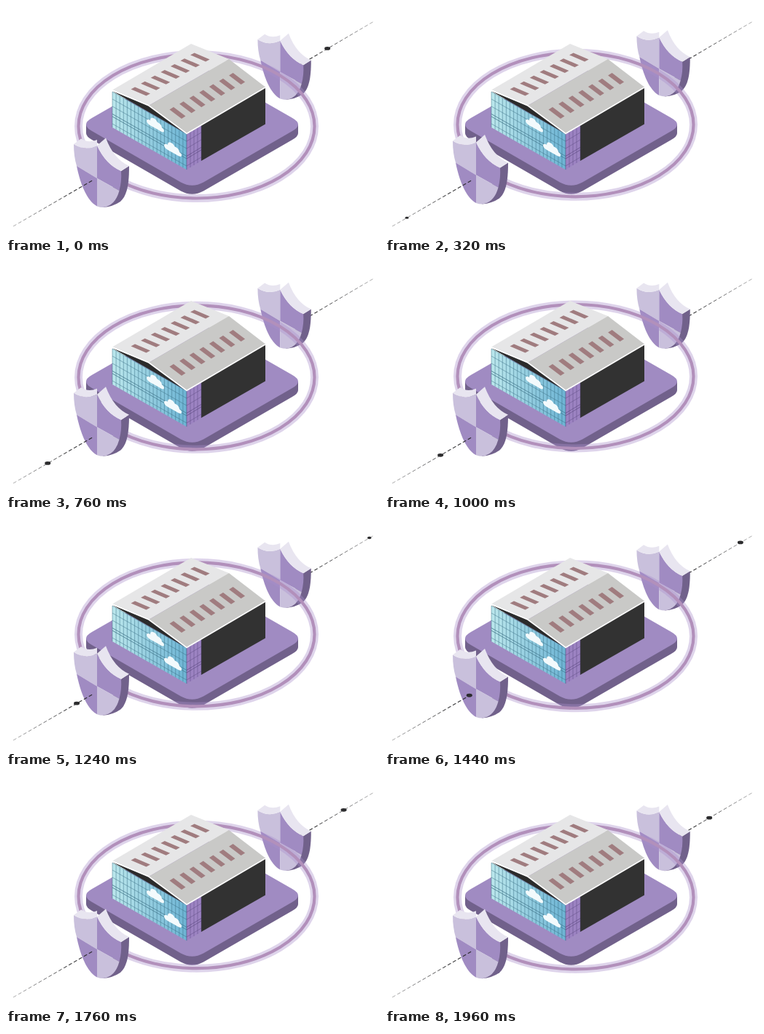
An HTML page that plays this animation: 512 px wide and 315 px high, repeating every 2000 ms.

```html
<!DOCTYPE html>
<html lang="en">
<head>
<meta charset="utf-8">
<title>Protected building</title>
<style>
  html, body { margin: 0; width: 100%; height: 100%; overflow: hidden; background: #fff; }
  svg { display: block; width: 100vw; height: 100vh; }
</style>
</head>
<body>
<svg viewBox="0 0 512 315">
  <defs>
    <linearGradient id="glass">
      <stop offset="0" stop-color="#bbe7ec"/>
      <stop offset="1" stop-color="#6db4d4"/>
    </linearGradient>
    <path id="slab" d="M118 172L240 242.5Q255.5 251 271 242.5L393 172Q409 163 393 154L271 84Q255.5 75 240 84L118 154Q102 163 118 172Z"/>
    <g id="cloud" fill="#f3fafc">
      <ellipse cx="-7" cy="2" rx="5" ry="3.5"/>
      <ellipse cx="-2" cy="-2" rx="5" ry="5"/>
      <ellipse cx="4" cy="0" rx="5" ry="4.5"/>
      <ellipse cx="8" cy="2.5" rx="4" ry="3"/>
      <rect x="-8" y="1" width="17" height="4.5" rx="2"/>
    </g>
    <g id="shield">
      <path fill="#71618b" d="M158 227L169 220C169 246 166 261 157 269Q147 276 133 277Z"/>
      <path fill="#c9c0dc" d="M93 190Q109 200 125 192V237L97 220Q93 207 93 190Z"/>
      <path fill="#a08bc2" d="M125 192Q137 218 158 227Q159 241 155.500 254L125 237Z"/>
      <path fill="#a08bc2" d="M97 220L125 237V275.500C111 268 102 245 97 220Z"/>
      <path fill="#c9c0dc" d="M125 237L155.500 254Q150 275 133 277Q129 277 125 275.500Z"/>
      <path fill="#e8e5f0" d="M93 190L103 182.500Q113 189 125 184V192Q109 200 93 190Z"/>
      <path fill="#e8e5f0" d="M125 192L137 181.500Q148 211 169 220L158 227Q137 218 125 192Z"/>
    </g>
  </defs>

  <g id="backLine"></g>
  <ellipse id="backDot" fill="#2c2c2e"/>
  <g id="backShield"><use href="#shield" transform="matrix(.965 0 0 .955 255.700 -135.500)"/></g>

  <use href="#slab" y="12" fill="#71618b"/>
  <path fill="#71618b" d="M110 163H401V175H110Z"/>
  <use href="#slab" fill="#a08bc2"/>

  <g id="ring" fill="none">
    <ellipse cx="261.500" cy="165.500" rx="162" ry="99" stroke="#a98fcb" stroke-opacity=".38" stroke-width="11"/>
    <ellipse cx="261.500" cy="165.500" rx="162" ry="99" stroke="#b290bb" stroke-width="4.200"/>
  </g>

  <g id="building">
    <path fill="#323232" d="M268 163L356 111V162.500L268 213Z"/>
    <path fill="#2b2b2b" d="M146 117L196 137L248 176Z"/>
    <g transform="matrix(1 .57 0 1 146 118)">
      <rect width="102" height="49" fill="url(#glass)"/>
      <g id="frontGrid" stroke="#376b80"></g>
      <use href="#cloud" x="59" y="11"/>
      <use href="#cloud" x="83" y="31"/>
    </g>
    <g transform="matrix(1 -.6 0 1 248 176)">
      <rect width="20" height="49" fill="#9c83c2"/>
      <g id="sideGrid" stroke="#5c4a80"></g>
    </g>
    <path fill="#e6e6e7" d="M146 115.500L254 52L306 73L196 137Z"/>
    <path fill="#c9c9c7" d="M196 137L306 73L356 111.500L248 175Z"/>
    <g id="vents" fill="#a07c7f"></g>
    <path fill="none" stroke="#fff" stroke-width="1.600" d="M146 116L196 137L248 175.500L356 112"/>
  </g>

  <g id="frontShield"><use href="#shield"/></g>
  <g id="frontLine"></g>
  <ellipse id="frontDot" fill="#2c2c2e"/>
</svg>
<script>
const LOOP = 2000;
const $ = id => document.getElementById(id);

function add(parent, tag, attrs) {
  const el = document.createElementNS('http://www.w3.org/2000/svg', tag);
  for (const key in attrs) el.setAttribute(key, attrs[key]);
  $(parent).append(el);
}

function grid(id, width, columns) {
  const line = (x1, y1, x2, y2, weight) =>
    add(id, 'line', { x1, y1, x2, y2, 'stroke-width': weight, 'stroke-opacity': .75 });
  for (let i = 0; i <= columns; i++) {
    const x = i * width / columns;
    line(x, 0, x, 49, .55);
  }
  for (const y of [0, 10, 20, 30.5, 34, 44]) line(0, y, width, y, y > 30 && y < 35 ? .9 : .55);
}

// Dashes grow heavier from the far end towards the shield.
function dashes(id, from, to) {
  const dx = to[0] - from[0], dy = to[1] - from[1];
  const length = Math.hypot(dx, dy);
  for (let d = 0; d < length; d += 8) {
    const a = d / length, b = Math.min(1, (d + 5) / length);
    add(id, 'line', {
      x1: from[0] + dx * a, y1: from[1] + dy * a,
      x2: from[0] + dx * b, y2: from[1] + dy * b,
      stroke: '#2c2c2e', 'stroke-width': .55 + .75 * a, 'stroke-opacity': .7 + .3 * a
    });
  }
}

function vents(d) {
  for (let i = 0; i < 7; i++)
    add('vents', 'path', { d, transform: `translate(${13.6 * i} ${-7.85 * i})` });
}

grid('frontGrid', 102, 20);
grid('sideGrid', 20, 4);
dashes('frontLine', [10, 303], [118.5, 240]);
dashes('backLine', [503.5, 22], [400, 83]);
vents('M171.500 114.500L177 111.500L198 120.500L192.500 123.500Z');
vents('M224.500 142.500L230 139L246.500 151.500L241 155Z');

const lift = (t, height, lead) =>
  -height / 2 * (1 - Math.cos(2 * Math.PI * (t + lead) / LOOP));

function moveDot(id, t, { start, span, x, y, reach, slope, power }) {
  const age = (t - start + LOOP) % LOOP;
  const travel = reach * (age / span) ** power;
  const size = age < span ? Math.min(1, .35 + age / 400) : 0;
  const dot = $(id);
  dot.setAttribute('cx', x + travel);
  dot.setAttribute('cy', y + travel * slope);
  dot.setAttribute('rx', 4 * size);
  dot.setAttribute('ry', 2.4 * size);
}

const frontPath = { start: 200, span: 1264, x: 26, y: 293.6, reach: 92, slope: -.583, power: 1.33 };
const backPath = { start: 1100, span: 1264, x: 503, y: 22, reach: -101, slope: -.59, power: 1.45 };

function render(t) {
  const shift = (id, y) => $(id).setAttribute('transform', `translate(0 ${y})`);
  const shieldY = lift(t, 12, 120) + .4;
  shift('frontShield', shieldY);
  shift('backShield', shieldY);
  shift('ring', lift(t, 9.5, 0));
  moveDot('frontDot', t, frontPath);
  moveDot('backDot', t, backPath);
}

const begin = performance.now();
function tick() {
  render((performance.now() - begin) % LOOP);
  requestAnimationFrame(tick);
}
tick();
</script>
</body>
</html>
```
